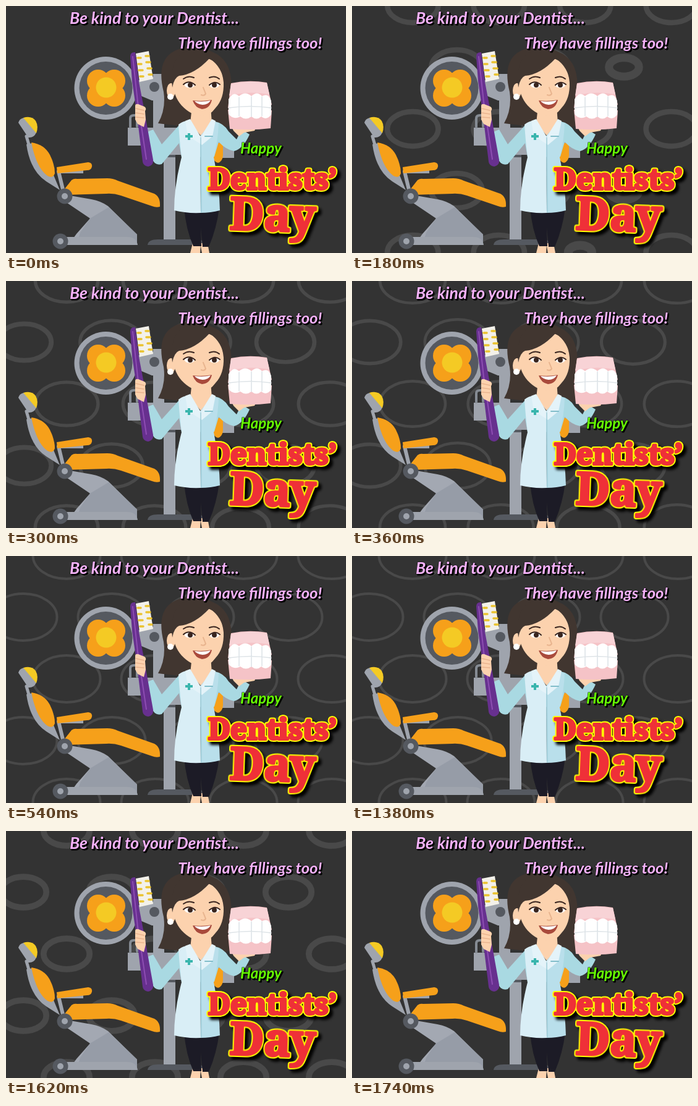
Write an HTML page that moves like this. It is 550x400 px and loops after 1.8 s.

```html
<!DOCTYPE html>
<html lang="en">
<head>
<meta charset="utf-8">
<title>Dentists’ Day</title>
<style>
html, body { margin: 0; width: 100%; height: 100%; overflow: hidden; background: #333; }
svg { display: block; width: 100vw; height: 100vh; }
#rings { fill: none; stroke: #494949; }
.steel { fill: #9fa4ad; }
.dark { fill: #555960; }
.orange { fill: #f6a01a; }
.yellow { fill: #f4ca24; }
.skin { fill: #fcd2ae; }
.hair { fill: #413630; }
.sleeve { fill: #a9d9e2; }
.line { fill: none; stroke-linecap: round; stroke-linejoin: round; }
.script { font: italic 700 26px Lato, sans-serif; fill: #f6b2fb; stroke: #111; stroke-width: 1px; paint-order: stroke; filter: drop-shadow(2px 2px 0 #000); }
.title { font-family: "Noto Serif", serif; font-weight: 900; stroke-linejoin: round; filter: drop-shadow(5px 5px 2px #000); }
.title .edge { fill: #ff0; stroke: #ff0; stroke-width: 8px; }
.title .face { fill: #ef3038; stroke: #ef3038; stroke-width: 4px; }
</style>
</head>
<body>
<svg viewBox="0 0 550 400" preserveAspectRatio="none">
<rect width="550" height="400" fill="#333"/>
<g id="rings"></g>

<!-- lamp and instrument stand -->
<g class="steel">
  <path d="M238 110h18v90h-18zM205 124l24-9h22v38h-15l-31-13zM255 225h19v155h-19z"/>
  <circle cx="161.5" cy="133" r="51"/>
  <path d="M197 197h85v29h-85zM229 226h60v15h-52q-8 0-8-8zM328 219h41v27h-41z"/>
</g>
<circle cx="161.5" cy="133" r="43" class="dark"/>
<g class="orange">
  <circle cx="149" cy="121" r="18"/><circle cx="175" cy="121" r="18"/>
  <circle cx="149" cy="145" r="18"/><circle cx="175" cy="145" r="18"/>
  <rect x="146" y="117" width="32" height="32"/>
  <path d="M334 222h17v20q-1 10-8 12-8-2-9-12z"/>
</g>
<circle cx="162" cy="132" r="16.5" class="yellow"/>
<circle cx="240" cy="131" r="8" class="dark"/>
<path class="line" d="M201 196v-14q0-5 6-5h5v18" stroke="#858b93" stroke-width="4"/>
<path class="dark" d="M255 241h19v4h-19z"/>
<path class="dark" d="M229 387q1-9 17-9h60q15 0 17 9z"/>

<!-- chair -->
<path class="line" d="M33 211l5 17" stroke="#9fa4ad" stroke-width="5"/>
<path class="steel" d="M20 189q2-7 9-8l20 24q-4 9-13 8z"/>
<path class="yellow" d="M28 181q13-4 20 5 5 9 1 20z"/>
<path class="steel" d="M33 224l10-2 34 52 10 24-22-14q-26-17-32-60z"/>
<path class="orange" d="M41 221q21 3 30 20 8 16 8 30-3 9-12 4-18-13-26-54z"/>
<path class="line" d="M85 268l7 29" stroke="#9fa4ad" stroke-width="6"/>
<path class="steel" d="M83 262h42v9H84z"/>
<path class="orange" d="M82 261l51-8q7 1 6 7-1 6-8 6l-48 5z"/>
<path class="orange" d="M95 296l11-14q4-3 9-2l49-1q9 0 17 4l59 21q10 5 9 21-6 2-13-1l-50-17q-12-4-24-3l-68 2z"/>
<path d="M98 306l40 7q16 3 27 11l47 46v17H101l13-18 22-25-40-27z" fill="#a3a8b2"/>
<path d="M136 344l30-18 46 44v17h-98l6-20z" fill="#969ca7"/>
<path class="steel" d="M91 374h105q15 0 17 13H91z"/>
<g class="dark"><circle cx="95" cy="308" r="12.5"/><circle cx="88" cy="381" r="12.5"/></g>
<g class="steel"><circle cx="95" cy="308" r="5"/><circle cx="88" cy="381" r="5"/></g>

<!-- dentist -->
<path class="hair" d="M246 190q13-23 9-51-13-52 19-67 31-14 59 2 36 14 31 66-2 29 7 51-37 13-64 6z"/>
<path class="skin" d="M302 384h13l-1 16h-16zM314 384h12l3 16h-12z"/>
<path d="M288 326h57q-4 34-17 64h-10l-3-31 1 30h-13q-12-27-15-63z" fill="#1c1b26"/>
<path class="skin" d="M301 162h30l2 28-17 21-18-21z"/>
<path class="sleeve" d="M292 186l22 25 21-25q18 4 25 17l13 13 8-16 13 8q-10 23-25 27-13-2-25-15l-7 24-53 1-4-23-28 34q-10 3-15-7l-13-43 14-6 14 24 28-31q12-6 17-7z"/>
<path d="M292 186q-7 1-13 6 2 29 5 53-12 46-12 86 20 5 43 4l-1-124z" fill="#d9eef6"/>
<path d="M314 211l21-25 9 4q-1 29-8 55 9 44 10 86-15 4-31 4z" fill="#b9dfeb"/>
<path d="M290 186l8-3 17 29 18-29 6 3-5 25-17 14-23-15z" fill="#e4f3f9"/>
<path class="line" d="M315 213l1 121" stroke="#9ecbd7" stroke-width="1.5"/>
<path d="M294 206h4v3h4v4h-4v4h-4v-4h-4v-4h4z" fill="#39b5ad"/>
<path class="line" d="M322 211h12" stroke="#81bdca" stroke-width="2"/>
<ellipse cx="267" cy="137" rx="7" ry="12" class="skin"/>
<path class="skin" d="M270 122q1-30 32-36h27q20 7 23 38 1 26-13 41-10 14-23 13-17-1-32-17-14-16-14-39z"/>
<path class="hair" d="M269 132q-5-44 18-56 24-13 48 0 23 10 19 52-4-30-25-43-24 26-49 28-8 3-11 19z"/>
<circle cx="266" cy="147" r="5" fill="#fff"/>
<g fill="#fff"><ellipse cx="297" cy="128" rx="8" ry="4.5"/><ellipse cx="337" cy="128" rx="8" ry="4.5"/></g>
<g fill="#39251f"><circle cx="298" cy="128" r="4"/><circle cx="337" cy="128" r="4"/></g>
<path class="line" d="M287 127q9-8 19 1M329 128q9-8 17-1M287 118q8-6 17-2M329 116q9-4 16 2" stroke="#39251f" stroke-width="2"/>
<path class="line" d="M319 132l4 10q-2 4-7 2" stroke="#e8b48e" stroke-width="2"/>
<path d="M302 153q16 2 31-1-3 14-16 15-11-2-15-14z" fill="#a94a3c"/>
<path d="M305 154q14 2 26-1-4 7-13 7-9-1-13-6z" fill="#fff"/>

<!-- toothbrush -->
<path d="M210 77l21-4 7 45-22 5z" fill="#f3f1ea"/>
<path class="line" d="M213 84h5M226 81h5M214 94h5M227 91h6M215 104h6M229 101h6M217 114h5M231 111h5" stroke="#eac32f" stroke-width="3.5"/>
<path d="M201 82q0-8 8-7l6 48 8 42 15 84q1 9-8 11-8-1-9-8l-10-82-7-48z" fill="#67308f"/>
<path class="line" d="M205 82l8 73 14 93" stroke="#8d4db2" stroke-width="2"/>
<path class="skin" d="M209 162q0-4 5-3l10 4q4 3 1 7l1 14-3 12-10-5-4-7z"/>
<path class="line" d="M210 166l13 3M210 173l13 2M210 180l13 1" stroke="#e9b48f" stroke-width="1.5"/>

<!-- model teeth -->
<path class="skin" d="M368 202q-5-10 3-12l25 4q10 2 6 8l-17 3-8 6z"/>
<path d="M364 125q29-6 58-1l8 36-71 5zM359 168l71 1-2 29q-31 4-66 1z" fill="#f5c3c7"/>
<path d="M364 126q29-6 58-1l4 18q-31-6-65 2z" fill="#f8d3d6"/>
<path d="M360 151q8-14 17-5 10-9 20 0 9-9 17 0 11-6 15 8v15h-69zM360 166h69v10q-8 10-16 3-8 7-16 0-9 7-18 0-11 6-19-4z" fill="#fff"/>
<path class="line" d="M360 165q35-5 69 0M377 148v30M397 147v32M414 147v31" stroke="#dce2e6" stroke-width="1.5"/>

<!-- lettering -->
<text class="script" x="103" y="29" style="font-size:26.5px">Be kind to your Dentist...</text>
<text class="script" x="278" y="69" style="font-size:25.6px">They have fillings too!</text>
<text class="script" x="379" y="239" style="font-size:24px;fill:#6f0">Happy</text>
<g class="title" font-size="47">
  <text class="edge" x="327" y="297">Dentists’</text><text class="face" x="327" y="297">Dentists’</text>
</g>
<g class="title" font-size="72" transform="rotate(2 432 345)">
  <text class="edge" x="362" y="364">Day</text><text class="face" x="362" y="364">Day</text>
</g>
</svg>
<script>
const LOOP = 1800;
const layer = document.getElementById('rings');
const rings = [];
const clamp = v => Math.max(0, Math.min(1, v));
const easeOut = (v, power) => 1 - (1 - v) ** power;

for (let row = 0; row < 5; row++) {
  for (let col = 0; col < 4; col++) {
    const node = document.createElementNS('http://www.w3.org/2000/svg', 'ellipse');
    const late = row % 2 ? col % 3 === 0 : row === 4 && col === 2;
    node.setAttribute('cy', row * 100 - 1);
    layer.append(node);
    rings.push({ node, x: (row % 2 ? 28 : 98) + col * 143, start: late ? 180 - 15 * col : 30 });
  }
}

function draw(time) {
  const t = Math.floor((time % LOOP) / 20) * 20;
  for (const { node, x, start } of rings) {
    const enter = easeOut(clamp((t - start) / (540 - start)), 3);
    const leave = easeOut(clamp((1740 - t) / 360), 2);
    const grow = Math.min(enter, leave);
    const size = Math.sqrt(grow);
    const width = 4 + 13 * (1 - grow);
    // Rings slide outwards a little while they open.
    node.setAttribute('cx', x - (x - 110) * 0.07 * (1 - enter));
    node.setAttribute('rx', Math.max(0, 56.5 * size - width / 2));
    node.setAttribute('ry', Math.max(0, 40 * size - width / 2));
    node.setAttribute('stroke-width', width);
    node.style.display = grow > 0 ? '' : 'none';
  }
}

const origin = performance.now();
function tick() {
  draw(performance.now() - origin);
  requestAnimationFrame(tick);
}
tick();
</script>
</body>
</html>
```
